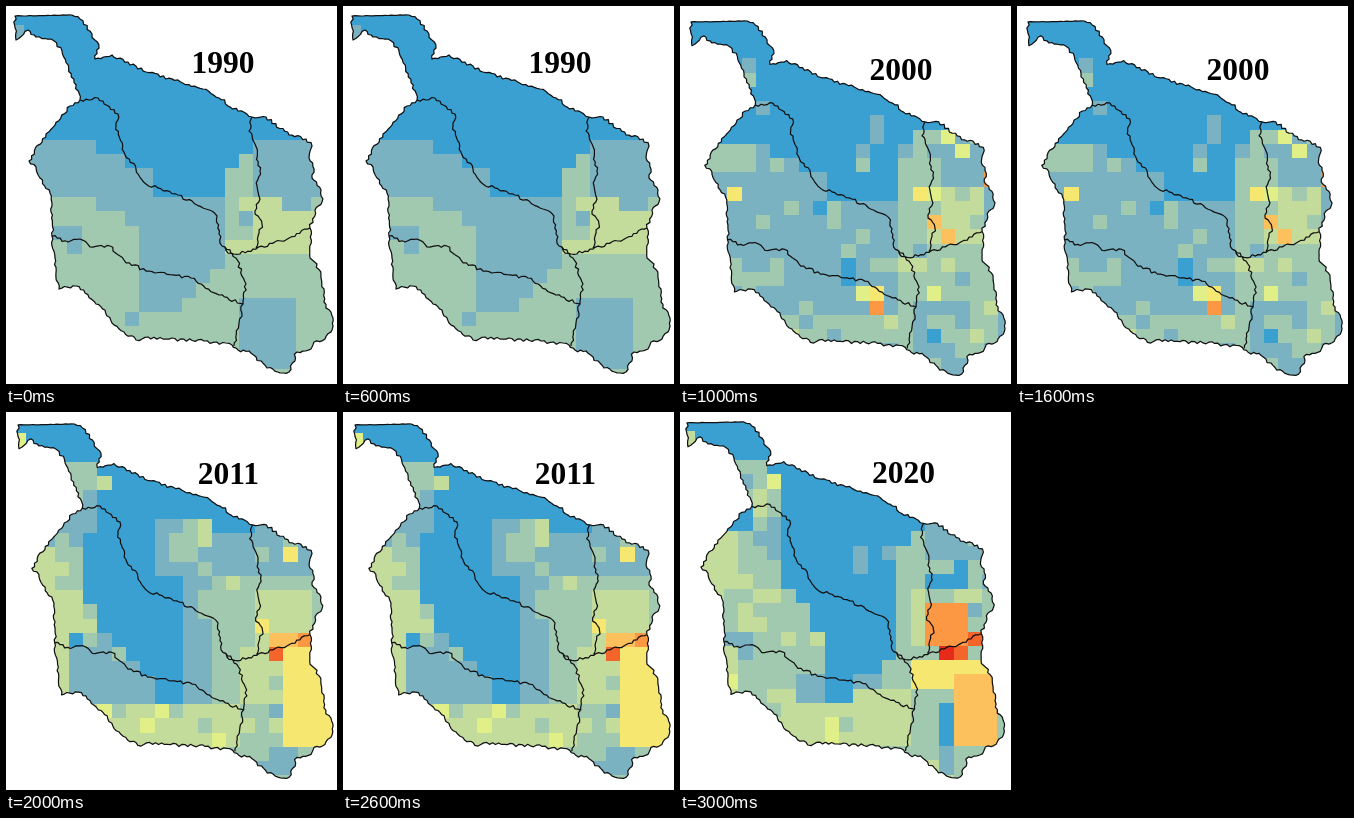
An HTML page for the animation above (4000 ms loop, 331 by 378 pixels).

```html
<!DOCTYPE html>
<html lang="en">
<head>
<meta charset="utf-8">
<title>Decade map</title>
<style>
html, body { margin: 0; width: 100%; height: 100%; overflow: hidden; background: #fff; }
svg { display: block; width: 100vw; height: 100vh; }
text { font: bold 31.5px "Liberation Serif", "Times New Roman", serif; text-anchor: middle; }
.cells { shape-rendering: crispEdges; }
.lines { fill: none; stroke: #111; stroke-width: 1.25; stroke-linejoin: round; }
</style>
</head>
<body>
<svg id="map" viewBox="0 0 331 378"></svg>
<script>
const svg = document.getElementById('map');
const HOLD = 1000, COLS = 24, ROWS = 26;

// Colour scale from low to high
const scale = {
  deep: '#3a9fd1', steel: '#7ab2c1', green: '#a1c9af', lime: '#c4dc9b', pale: '#e0ef87',
  yellow: '#f5e76f', amber: '#fcc05c', orange: '#fc9743', flame: '#f4652c', red: '#e62b1b'
};
const levels = Object.keys(scale);

// Key points of the coast, clockwise; small bends are added by rough()
const coast = [
  '9,10 66,9 74,13 86,28 93,42 89,53 106,49 140,66 197,83 213,92 232,105 246,111 260,111 283,129 300,133 306,140',
  '303,152 308,163 306,172 315,184 316,196 309,204 304,222 304,252 311,258 318,283 318,296 327,312 327,320 319,333 308,336 305,343 291,346 283,366 277,367',
  '261,362 243,345 232,344 226,339 198,335 160,333 142,331 130,334 118,326 106,317 99,304 90,298 79,287 70,280 53,283 49,252 46,230',
  '46,200 44,187 34,172 30,161 23,155 40,128 64,100 74,94 56,45 45,33 30,31 22,24 10,34 9,10'
].join(' ');
const borders = [
  '74,94 92,92 112,108 110,120 118,146 140,178 172,189 200,203 211,210 213,228 216,240 230,252 240,278 237,298 228,340',
  '46,230 62,236 74,233 84,241 104,240 118,254 140,265 185,272 213,289 237,298',
  '246,111 243,125 249,138 254,165 251,180 254,193 249,205 256,218 250,242',
  '216,240 228,248 250,243 275,235 304,222'
];

// Zones in cell units, later ones on top: a polygon, or a rounded box
// given by its centre and half sizes (a single cell by default).
// grid: x, y, cell width, cell height. fit: x, y, scale x, scale y.
const scenes = [
  {
    year: '1990', label: [217, 67], base: 'green', noise: 0,
    grid: [4, 4.5, 14.32, 14.35], fit: [0, 0, 1, 1],
    zones: [
      ['steel', '0,9 15,9 15,18 12,21 9,21 9,15 5,13 0,13'],
      ['deep', '0,0 24,0 24,9 17.4,9 15,11.4 15,13 10,13 10,11.4 5.5,9 0,9'],
      ['steel', 19.5, 11.2, 2.5, 2.4], ['lime', 19.5, 15.5, 2.5, 1.5], ['lime', 17.5, 13.5, 1.5, .5],
      ['lime', 16, 16.5, 1, .5], ['steel', 16.5, 14.5], ['steel', 4, 15.5, 1, .5], ['steel', 4.5, 16.5],
      ['steel', 18, 22.5, 2, 2.5], ['steel', 8.5, 21.5], ['steel', .5, 1.5]
    ]
  },
  {
    year: '2000', label: [221, 74], base: 'steel', noise: .2,
    grid: [4.7, 9.5, 14.25, 14.25], fit: [2.1, 6.1, .9875, .989],
    zones: [
      ['green', 3, 10, 2, 1], ['green', 16.5, 12.5, 1.5, 4.5], ['lime', 19, 14, 2, 2],
      ['green', 18.5, 20, 3.5, 4], ['green', 4.5, 18, 2.5, 1.5], ['green', 10, 22, 5, 1],
      ['steel', 18, 22.5, 2, 2.5], ['lime', 16, 17.5, 1, 1],
      ['deep', '0,0 24,0 24,7 17,8 15,10 15,13 10,13 10,11.4 5.5,9 0,9'],
      ['steel', 13.5, 8, .5, 1], ['steel', 12.5, 10, .5, 1], ['steel', 4.5, 3.5], ['green', 4.5, 4.5],
      ['steel', 5.5, 6.5], ['deep', 9.5, 13.5], ['deep', 11.5, 18, .5, 1], ['deep', 17.5, 22.5],
      ['pale', 18.5, 8.5], ['pale', 19.5, 9.5], ['pale', 12.5, 19.5], ['pale', 17.5, 19.5],
      ['yellow', 3.5, 12.5], ['yellow', 16.5, 12.5], ['yellow', 13.5, 19.5],
      ['amber', 17.5, 14.5], ['amber', 18.5, 15.5], ['orange', 21.5, 11.5], ['orange', 13.5, 20.5]
    ]
  },
  {
    year: '2011', label: [222.5, 72], base: 'green', noise: .15,
    grid: [5.6, 7, 14.3, 14.25], fit: [3.1, 3.1, .99, .989],
    zones: [
      ['steel', 4, 7.5, 2, 1.5], ['lime', 1.5, 11, 1.5, 2], ['lime', 3.5, 16, 1.5, 4],
      ['steel', 7, 17.5, 3, 2.5], ['lime', 10, 21.5, 6.5, 1.5], ['steel', 13, 15, 1, 5],
      ['steel', 15, 9.5, 2, 1.5], ['steel', 11, 9, 1, 2], ['steel', 19, 9, 2, 2],
      ['lime', 19, 14, 2.5, 2], ['lime', 17.5, 18, 1.5, 2], ['yellow', 21, 19.5, 2, 4], ['steel', 19, 24, 1, 1],
      ['deep', '0,0 24,0 24,7 17,7 17,8 14,8 14,7 10,7 10,11 12,11 12,20 10,20 10,18 6,14 5,12 5,9 6,7 6,3 0,3'],
      ['lime', .5, 1.5], ['lime', 6.5, 4.5], ['lime', 13.5, 8.5], ['deep', 4.5, 15.5], ['yellow', 19.5, 9.5],
      ['yellow', 17.5, 14.5], ['amber', 19, 15.5, 1, .5], ['orange', 20.5, 15.5], ['flame', 18.5, 16.5]
    ]
  },
  {
    year: '2020', label: [223.5, 71], base: 'green', noise: .12,
    grid: [1, 5, 14.35, 14.3], fit: [-2, 1, .998, .994],
    zones: [
      ['lime', 2.5, 10, 1.5, 2.5], ['deep', 3.5, 7, 1.5, 1], ['lime', 5.5, 6, .5, 1], ['steel', 6.5, 9, .5, 2],
      ['lime', 5, 14.5, 1, .5], ['steel', 4, 16, 1, 1], ['lime', 3.5, 19, 1, 2.5], ['lime', 11, 21, 5.5, 2],
      ['steel', 9, 19, 1, 1], ['steel', 13, 18, 1, 1], ['lime', 16.5, 13, .5, 3], ['steel', 19, 8.5, 2, 1.5],
      ['lime', 20, 12.5, 1, 1], ['yellow', 19, 18, 3, 1], ['amber', 20.5, 20.5, 1.5, 2.5], ['steel', 18.5, 24, 1, 1],
      ['deep', '0,0 24,0 24,6 17,7 16,9 14,9 14,10 15,10 15,16 14,18 12,18 12,20 10,20 10,16 9,13 7,12 7,5 6,3 0,3'],
      ['lime', .5, 1.5], ['pale', 6.5, 4.5], ['steel', 12.5, 10, .5, 1], ['steel', 14.5, 9.5],
      ['deep', 18.5, 11.5, 1.5, .5], ['deep', 19.5, 10.5], ['deep', 18.5, 21.5, .5, 1.5],
      ['orange', 18.5, 14.5, 1.5, 1.5], ['flame', 20.5, 15.5], ['flame', 19.5, 16.5], ['red', 18.5, 16.5]
    ]
  }
];

function add(parent, name, attrs = {}) {
  const node = document.createElementNS('http://www.w3.org/2000/svg', name);
  for (const key in attrs) node.setAttribute(key, attrs[key]);
  parent.appendChild(node);
  return node;
}

let seed = 17;
function random() {
  seed = (seed * 16807) % 2147483647;
  return seed / 2147483647;
}

const parse = run => run.split(' ').map(p => p.split(',').map(Number));

// Splits each segment into short steps pushed off the line
function rough(run) {
  const points = parse(run);
  let d = 'M' + points[0];
  for (let i = 1; i < points.length; i++) {
    const [x, y] = points[i - 1];
    const [x2, y2] = points[i];
    const dx = x2 - x, dy = y2 - y, length = Math.hypot(dx, dy);
    const steps = Math.max(1, Math.round(length / 3));
    const swing = dy && Math.abs(dx / dy) > 20 ? .5 : 3.2;
    for (let s = 1; s < steps; s++) {
      const off = (random() - .5) * swing / length, t = s / steps;
      d += `L${(x + dx * t - dy * off).toFixed(1)},${(y + dy * t + dx * off).toFixed(1)}`;
    }
    d += `L${x2},${y2}`;
  }
  return d;
}

function inPolygon(points, x, y) {
  let inside = false;
  points.forEach(([ax, ay], i) => {
    const [bx, by] = points[(i + 1) % points.length];
    if (ay > y !== by > y && x < ax + (bx - ax) * (y - ay) / (by - ay)) inside = !inside;
  });
  return inside;
}

function zoneTest([color, ...shape]) {
  const level = levels.indexOf(color);
  if (typeof shape[0] === 'string') {
    const points = parse(shape[0]);
    return { level, has: (x, y) => inPolygon(points, x, y) };
  }
  const [cx, cy, rx = .5, ry = .5] = shape;
  return { level, has: (x, y) => ((x - cx) / rx) ** 4 + ((y - cy) / ry) ** 4 <= 1 };
}

// Level of every cell: topmost zone, with some mid levels nudged by one
function paintCells(parent, { base, zones, noise, grid: [x0, y0, w, h] }) {
  const tests = zones.map(zoneTest).reverse();
  const paths = levels.map(() => '');
  for (let row = 0; row < ROWS; row++) {
    for (let col = 0; col < COLS; col++) {
      const zone = tests.find(t => t.has(col + .5, row + .5));
      let level = zone ? zone.level : levels.indexOf(base);
      const nudge = random() < noise ? (random() < .4 ? -1 : 1) : 0;
      if (level > 0 && level < 4) level = Math.max(1, level + nudge);
      paths[level] += `M${x0 + col * w},${y0 + row * h}h${w}v${h}h${-w}z`;
    }
  }
  paths.forEach((d, i) => add(parent, 'path', { d, fill: scale[levels[i]] }));
}

const outline = rough(coast) + 'z';
const lines = outline + borders.map(rough).join('');

const views = scenes.map((scene, i) => {
  const [x, y, sx, sy] = scene.fit;
  const transform = `translate(${x} ${y}) scale(${sx} ${sy})`;
  const view = add(svg, 'g');
  const clip = add(view, 'clipPath', { id: 'land' + i });
  add(clip, 'path', { d: outline, transform });
  const land = add(view, 'g', { 'clip-path': `url(#land${i})` });
  paintCells(add(land, 'g', { class: 'cells' }), scene);
  add(view, 'path', { class: 'lines', d: lines, transform });
  add(view, 'text', { x: scene.label[0], y: scene.label[1] }).textContent = scene.year;
  return view;
});

function draw(time) {
  const current = Math.floor(time / HOLD) % views.length;
  views.forEach((view, i) => view.setAttribute('display', i === current ? 'inline' : 'none'));
}

const start = performance.now();
function tick() {
  draw(performance.now() - start);
  requestAnimationFrame(tick);
}
tick();
</script>
</body>
</html>
```
